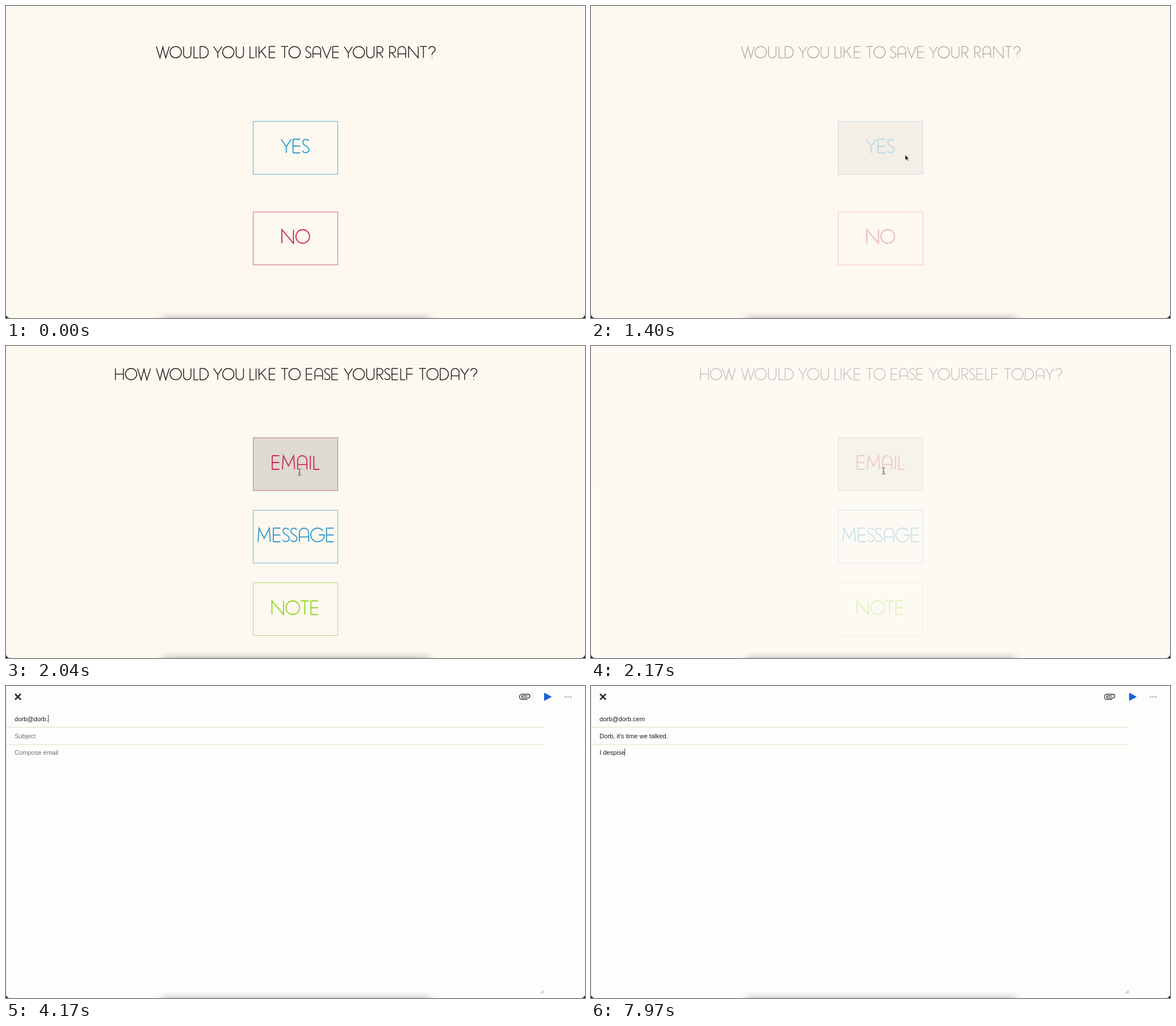
Write an HTML page that moves like this. It is 1020 by 549 pixels and loops after 8000 ms.

```html
<!DOCTYPE html>
<html lang="en">
<head>
<meta charset="utf-8">
<title>Rant composer</title>
<style>
html, body { margin: 0; width: 100%; height: 100%; overflow: hidden; background: #111; }
.stage { position: relative; width: 1020px; height: 549px; overflow: hidden; background: #fdf8f0; border-radius: 0 0 7px 7px; }
.layer { position: absolute; left: 0; top: 0; width: 1020px; height: 549px; animation: 8s linear infinite both; }
svg { display: block; overflow: visible; fill: none; }

.save { animation-name: save; }
.choose { animation-name: choose; }
.paper { background: #fdfdfc; box-shadow: inset 1px 0 #e6e6e6; animation-name: paper; }
.mail { animation-name: mail; }
.tint { fill: #000; opacity: 0; animation: 8s linear infinite both; }
.yes { animation-name: hoverYes; }
.email { animation-name: hoverEmail; }

@keyframes save { 0%, 13.75% { opacity: 1; } 19.4%, 100% { opacity: 0; } }
@keyframes choose { 0%, 19.4% { opacity: 0; } 24.4%, 25.75% { opacity: 1; } 28%, 100% { opacity: 0; } }
@keyframes paper { 0%, 26% { opacity: 0; } 29.5%, 100% { opacity: 1; } }
@keyframes mail { 0%, 27.5% { opacity: 0; } 31.25%, 100% { opacity: 1; } }
@keyframes hoverYes { 0%, 9.5% { opacity: 0; } 11%, 100% { opacity: .12; } }
@keyframes hoverEmail { 0%, 22.6% { opacity: 0; } 24%, 100% { opacity: .12; } }

.row { position: absolute; left: 15px; margin: 0; height: 14px; white-space: pre; color: #1c1c1c;
  font: 11.1px/14px "Liberation Sans", Arial, sans-serif; }
.hint { color: #707070; }
.caret { position: absolute; width: 1px; height: 13px; margin-top: 0; background: #444; visibility: hidden; }
.focus .caret { visibility: visible; }

.dock { position: absolute; left: 276px; top: 552px; width: 470px; height: 20px; box-shadow: 0 0 15px 1px rgba(0, 0, 0, .42); }

.mouse { position: absolute; left: 0; top: 0; animation: move 8s ease-in-out infinite both, show 8s step-end infinite both; }
.mouse svg { position: absolute; left: 0; top: 0; width: 1px; height: 1px; }
.arrow { animation: arrow 8s step-end infinite both; }
.beam { animation: beam 8s step-end infinite both; }
@keyframes move {
  0%, 3.75% { transform: translate(620px, 330px); }
  11.25%, 20.6% { transform: translate(553px, 262px); }
  25%, 25.5% { transform: translate(517px, 222px); }
  30%, 33.1% { transform: translate(511px, 214px); }
  40%, 100% { transform: translate(60px, 58px); }
}
@keyframes show { 0% { opacity: 0; } 3.75% { opacity: 1; } 43.5%, 100% { opacity: 0; } }
@keyframes arrow { 0% { opacity: 1; } 24%, 100% { opacity: 0; } }
@keyframes beam { 0% { opacity: 0; } 24%, 100% { opacity: 1; } }
</style>
</head>
<body>
<div class="stage">
  <svg class="layer save" id="save" role="img" aria-label="Would you like to save your rant? Yes. No.">
    <rect class="tint yes" x="435" y="203" width="150" height="93"/>
    <rect x="435.5" y="203" width="149" height="93" stroke="#55abd6"/>
    <rect x="435.5" y="362.5" width="149" height="93" stroke="#e0627e"/>
  </svg>

  <svg class="layer choose" id="choose" role="img" aria-label="How would you like to ease yourself today? Email. Message. Note.">
    <rect class="tint email" x="435" y="161" width="150" height="94"/>
    <rect x="435.5" y="161.5" width="149" height="93" stroke="#c9748a"/>
    <rect x="435.5" y="289" width="149" height="93" stroke="#6fb0dc"/>
    <rect x="435.5" y="416.5" width="149" height="93" stroke="#b4dc62"/>
  </svg>

  <div class="layer paper"></div>
  <div class="layer mail">
    <svg width="1020" height="549">
      <path d="M0 72.5H948M0 103H948" stroke="#dcdfbe"/>
      <path d="M16 14L26 24M26 14L16 24" stroke="#2d2d2d" stroke-width="2.7"/>
      <path d="M918 23.5H909a4.5 4.5 0 0 1 0-9H919.5a3.2 3.2 0 0 1 0 6.4H910a1.7 1.7 0 0 1 0-3.4h8" stroke="#333" stroke-width="1.4" stroke-linecap="round"/>
      <path id="send" d="M948.7 13V25L960 19Z" stroke-width="1.6" stroke-linejoin="round"/>
      <path d="M984.5 19h2.6m2 0h2.6m2 0h2.6" stroke="#b2b2b2" stroke-width="3"/>
      <path d="M942 541L947.5 535.5M945 541L947.5 538.5" stroke="#777" stroke-width=".9"/>
    </svg>
    <p class="row" id="to" style="top:51px"><span class="typed"></span><i class="caret"></i><span class="hint">To</span></p>
    <p class="row" id="subject" style="top:81px"><span class="typed"></span><i class="caret"></i><span class="hint">Subject</span></p>
    <p class="row" id="body" style="top:110px"><span class="typed"></span><i class="caret"></i><span class="hint">Compose email</span></p>
  </div>

  <div class="dock"></div>
  <div class="mouse">
    <svg class="arrow"><path d="M.5 0V9.2L2.6 7.3 4.2 10.5 5.7 9.8 4.2 6.7H7Z" fill="#111" stroke="#fff" stroke-width=".5"/></svg>
    <svg class="beam"><path d="M-3-5.5Q0-5.5 0-4Q0-5.5 3-5.5M0-4V4M-3 5.5Q0 5.5 0 4Q0 5.5 3 5.5M-1.5 1.5H1.5" stroke="#555" stroke-width="1.1"/></svg>
  </div>
</div>

<script>
const LOOP = 8000;

// Monoline capitals on a 20 unit cap height: [path, width, side bearing]
const stem = 'M0 0V20';
const bars = (w, ...ys) => ys.map(y => `M0 ${y}H${w}`).join('');
const glyphs = {
  A: ['M0 20V7A6.8 7 0 0 1 13.6 7V20' + bars(13.6, 13), 13.6, 2.4],
  D: [stem + 'H4.5A10 10 0 0 0 4.5 0H0', 14.5, 2.6],
  E: [stem + bars(10.5, 0, 10, 20), 10.5, 2.4],
  F: [stem + bars(10.5, 0, 10), 10.5, 2.4],
  G: ['M18 4A10 10 0 1 0 20 10H12', 20, .7],
  H: [stem + 'M14 0V20' + bars(14, 10), 14, 2.6],
  I: [stem, 0, 2.6],
  K: [stem + 'M12 0L0 12M4 8L13 20', 13, 2.6],
  L: [stem + 'H8', 5.5, 2.6],
  M: ['M0 20L1.5 0 9 15 16.5 0 18 20', 18, 2],
  N: ['M0 20V0L17 20V0', 17, 2.6],
  O: ['M0 10A10 10 0 0 1 20 10A10 10 0 0 1 0 10', 20, 1],
  R: ['M0 20V0H5A5.5 5.5 0 0 1 5 11H0M4 11L10.5 20', 10, 2.4],
  S: ['M9 2.5C7-1 .5-1 .5 4.5S9.5 9.5 9.5 15 2 21 0 17', 9.5, 1],
  T: [bars(12, 0) + 'M6 0V20', 12, .6],
  U: ['M0 0V13.5A6.5 6.5 0 0 0 13 13.5V0', 13, 2.8],
  V: ['M0 0L8 20 16 0', 16, .2],
  W: ['M0 0L6.5 20 11.5 1 16.5 20 23 0', 23, .2],
  Y: ['M0 0L7.2 11 14.5 0M7.2 11V20', 14.5, .3],
  '?': ['M0 4.5A5.5 5 0 1 1 8 9.5Q5.5 11 5.5 15M5.5 18.8V20', 11, 3]
};

const $ = id => document.getElementById(id);

function svgNode(name, attrs, parent) {
  const node = document.createElementNS('http://www.w3.org/2000/svg', name);
  for (const key in attrs) node.setAttribute(key, attrs[key]);
  return parent.appendChild(node);
}

function letter(page, word, x, y, scale, color) {
  const group = svgNode('g', {
    transform: `translate(${x} ${y}) scale(${scale})`, stroke: color, 'stroke-width': 1.5
  }, $(page));
  let pen = 0;
  [...word].forEach((char, i) => {
    const [d, width, bearing] = glyphs[char];
    if (i) pen += bearing;
    svgNode('path', { d, transform: `translate(${pen} 0)` }, group);
    pen += width + bearing;
  });
}

const heading = (page, y, words) =>
  words.forEach(([word, x]) => letter(page, word, x, y, 1, '#28221f'));
const label = (page, word, x, y, color) => letter(page, word, x, y, 1.2, color);

const shared = [['WOULD', 264.8], ['YOU', 365.8], ['LIKE', 429.8], ['TO', 484.8]];
heading('save', 71.3, [...shared, ['SAVE', 527.8], ['YOUR', 595.8], ['RANT?', 675.8]]);
heading('choose', 39.5, [['HOW', 192.8], ...shared, ['EASE', 528.8], ['YOURSELF', 595.8], ['TODAY?', 727.8]]);
label('save', 'YES', 485, 234.5, '#2399ce');
label('save', 'NO', 486, 393.5, '#d0214d');
label('choose', 'EMAIL', 469, 193, '#cc2a50');
label('choose', 'MESSAGE', 444, 320.5, '#2d94cf');
label('choose', 'NOTE', 468.5, 448.5, '#8fd41c');

// keys: [time, characters typed so far]
const fields = [
  { id: 'to', text: 'dorb@dorb.cem', focus: 3340, blur: 4570,
    keys: [[3480, 1], [4150, 10], [4240, 11], [4420, 13]] },
  { id: 'subject', text: "Dorb, it's time we talked.", focus: 4570, blur: 7210,
    keys: [[4760, 1], [5480, 7], [5570, 8], [5810, 9], [6390, 19], [6480, 20], [6960, 26]] },
  { id: 'body', text: 'I despise', focus: 7210, blur: LOOP,
    keys: [[7300, 1], [7400, 2], [7570, 3], [7950, 9]] }
];

function typedCount(keys, t) {
  if (t < keys[0][0]) return 0;
  for (let i = 1; i < keys.length; i++) {
    const [t0, n0] = keys[i - 1], [t1, n1] = keys[i];
    if (t < t1) return Math.floor(n0 + (n1 - n0) * (t - t0) / (t1 - t0));
  }
  return keys[keys.length - 1][1];
}

function render(t) {
  for (const { id, text, focus, blur, keys } of fields) {
    const row = $(id), n = typedCount(keys, t);
    row.querySelector('.typed').textContent = text.slice(0, n);
    row.querySelector('.hint').style.display = n ? 'none' : '';
    row.classList.toggle('focus', t >= focus && t < blur);
  }
  const color = t < fields[0].keys[0][0] ? '#c6c6c6' : '#1b62dc';
  $('send').setAttribute('fill', color);
  $('send').setAttribute('stroke', color);
}

let start;
function frame(now) {
  start ??= now;
  render((now - start) % LOOP);
  requestAnimationFrame(frame);
}
render(0);
requestAnimationFrame(frame);
</script>
</body>
</html>
```
